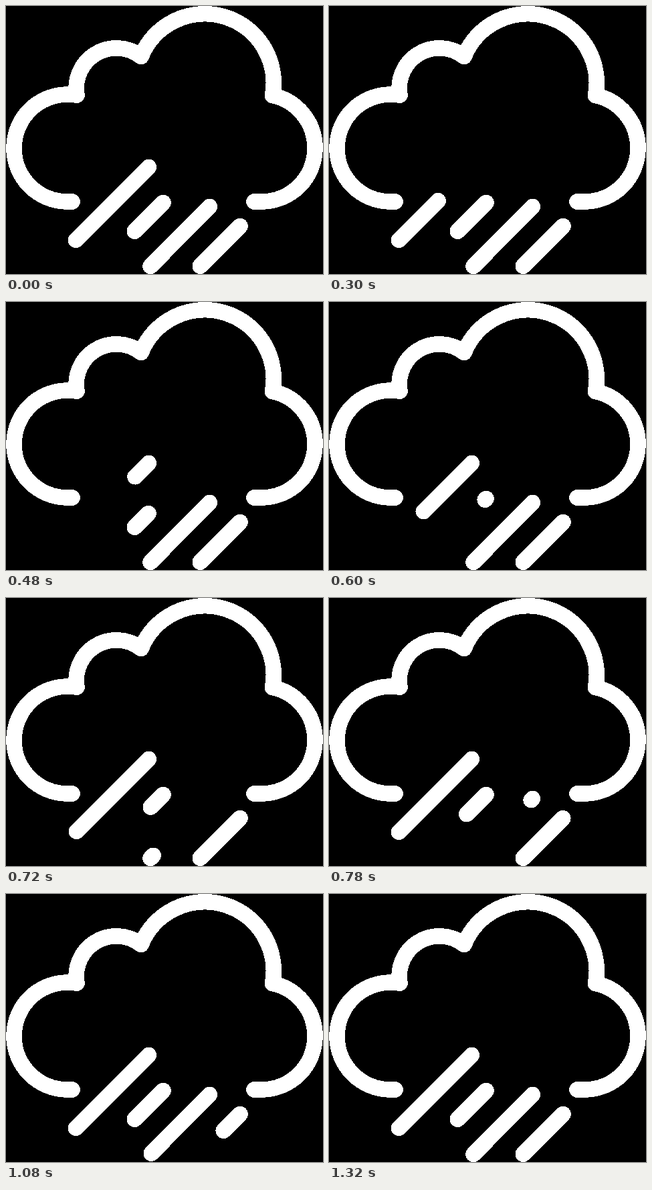
These frames come from a looping animation (474 px wide and 400 px high, 1440 ms). An HTML page:

```html
<!DOCTYPE html>
<html lang="en">
<head>
<meta charset="utf-8">
<title>Rain cloud</title>
<style>
  html, body { margin: 0; width: 100%; height: 100%; overflow: hidden; background: #000; }
  svg { display: block; fill: none; stroke: #fff; stroke-width: 23.6; stroke-linecap: round; stroke-linejoin: round; shape-rendering: crispEdges; }
</style>
</head>
<body>
<svg width="474" height="400" viewBox="0 0 474 400">
  <path d="M 99 292 H 92
    A 80 80 0 0 1 12 212
    A 80 80 0 0 1 106 133.2
    A 60 60 0 0 1 202 75.5
    A 103 103 0 0 1 398.5 133.5
    A 80 80 0 0 1 462 212
    A 80 80 0 0 1 382 292
    H 371"/>
  <g id="rain"></g>
</svg>
<script>
const LOOP = 1440, STEP = 60;
const DRAIN = [235, 372], REFILL = [381, 740];

const drops = [
  { top: [213.3, 240.5], end: [104.5, 349.3], delay: 0 },
  { top: [235, 293.5], end: [192.3, 336.2], delay: 175 },
  { top: [304.3, 299.5], end: [216, 388.5], delay: 366 },
  { top: [350, 328.5], end: [290.3, 388.2], delay: 540 }
];

const rain = document.getElementById('rain');
for (const drop of drops) {
  drop.path = document.createElementNS('http://www.w3.org/2000/svg', 'path');
  rain.append(drop.path);
}

function ease(time, [start, stop]) {
  const x = Math.min(1, Math.max(0, (time - start) / (stop - start)));
  return x * x * (3 - 2 * x);
}

const pointAt = ({ top, end }, k) => top.map((v, i) => v + (end[i] - v) * k);

// Each streak drains towards its lower end, then grows again from the top.
function draw(now) {
  const time = Math.floor((now % LOOP) / STEP) * STEP;
  for (const drop of drops) {
    const local = time - drop.delay;
    const draining = local < DRAIN[1];
    const from = draining ? ease(local, DRAIN) : 0;
    const to = draining ? 1 : ease(local, REFILL);
    drop.path.setAttribute('d', `M${pointAt(drop, from)}L${pointAt(drop, to)}`);
  }
}

const began = performance.now();
function tick() {
  draw(performance.now() - began);
  requestAnimationFrame(tick);
}
tick();
</script>
</body>
</html>
```
